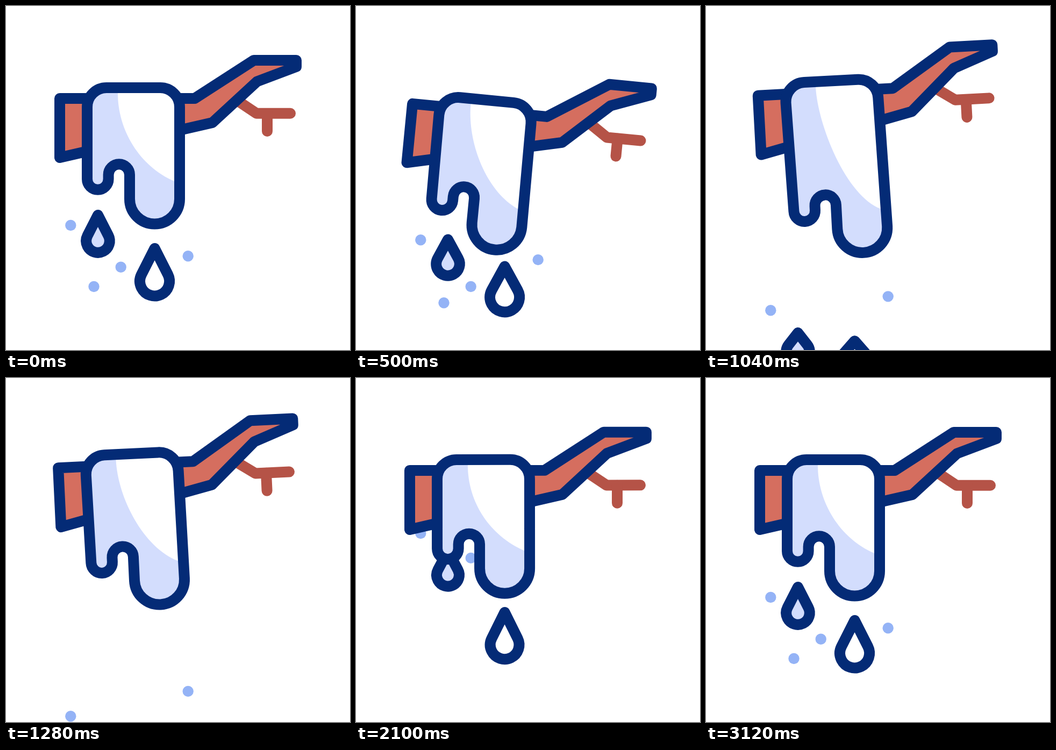
Animation of 640x640 px, one loop 3600 ms. Source, as an HTML page with a canvas:

```html
<!DOCTYPE html>
<html lang="en">
<head>
<meta charset="utf-8">
<title>Melting snow</title>
<style>
html, body { margin: 0; width: 100%; height: 100%; overflow: hidden; background: #fff; }
canvas { display: block; width: 640px; height: 640px; }
</style>
</head>
<body>
<canvas id="stage" width="640" height="640"></canvas>
<script>
const ctx = document.getElementById('stage').getContext('2d');
const LOOP = 3600;
const NAVY = '#042b76', RED = '#d56e5f', BARK = '#b55347';
const SNOW = '#d3ddfd', DOT = '#94b3f6', WHITE = '#fff';

const clamp = v => Math.min(1, Math.max(0, v));
const lerp = (a, b, p) => a + (b - a) * p;
const smooth = v => { const x = clamp(v); return x * x * (3 - 2 * x); };
const firm = v => {
  const x = clamp(v);
  return (smooth(x) + x * x * x * (x * (6 * x - 15) + 10)) / 2;
};

// keys: [time, value] pairs
function track(keys, t, ease) {
  let [t0, v0] = keys[0];
  for (const [t1, v1] of keys) {
    if (t < t1) return t <= t0 ? v0 : lerp(v0, v1, ease((t - t0) / (t1 - t0)));
    t0 = t1; v0 = v1;
  }
  return v0;
}

const TILT = [[200, 0], [600, 6.3], [1000, -3.08], [2200, 0]];
const MELT = [[200, 0], [1000, 70], [1580, -15], [2400, 0]];

// out / back: [start, duration, distance]
const dots = [
  { x: 120.3, y: 408, out: [200, 1600, 294], back: [1800, 1320, 137] },
  { x: 338.7, y: 465.3, out: [300, 2000, 242], back: [2000, 1100, 265] },
  { x: 213.7, y: 485.7, out: [200, 1080, 191], back: [1700, 1100, 216] },
  { x: 163.5, y: 522, out: [200, 1120, 170], back: [1700, 1420, 217] }
];

// r, h: radius and tip height at rest; seed: both when newly formed; flat: tip loss while falling
const drops = [
  { x: 171, y: 437, r: 21.8, h: 48, seed: [20, 40], flat: 15, fill: SNOW,
    out: [200, 1140, 249], back: [1700, 780, 147] },
  { x: 276.6, y: 512, r: 27.5, h: 61, seed: [21.5, 22], flat: 26, fill: WHITE,
    out: [200, 1250, 204], back: [1490, 765, 149] }
];

function fall(o, t) {
  const returning = t >= o.back[0];
  const [start, time, dist] = returning ? o.back : o.out;
  const p = smooth((t - start) / time);
  return { returning, p, y: o.y + (returning ? dist * (p - 1) : dist * p) };
}

function drawDot(o, t) {
  ctx.beginPath();
  ctx.arc(o.x, fall(o, t).y, 10.2, 0, Math.PI * 2);
  ctx.fillStyle = DOT;
  ctx.fill();
}

function drawDrop(o, t) {
  const { returning, p, y } = fall(o, t);
  const r = returning ? lerp(o.seed[0], o.r, p) : o.r;
  const h = returning ? lerp(o.seed[1], o.h, clamp(p * 1.1)) : o.h - o.flat * p;
  const a = Math.asin(Math.min(1, r / h));
  ctx.beginPath();
  ctx.moveTo(o.x, y - h);
  ctx.arc(o.x, y, r, -a, Math.PI + a);
  ctx.closePath();
  paint(o.fill);
}

function paint(fill) {
  ctx.fillStyle = fill;
  ctx.fill();
  ctx.strokeStyle = NAVY;
  ctx.stroke();
}

function poly(points) {
  ctx.beginPath();
  for (const [x, y] of points) ctx.lineTo(x, y);
}

function drawTwig() {
  ctx.strokeStyle = BARK;
  poly([[420, 169], [466, 199.7], [529, 199.7]]);
  ctx.stroke();
  poly([[486, 200], [486, 233]]);
  ctx.stroke();
}

function drawBranch() {
  poly([[100, 172], [351, 172], [461, 101], [540, 101], [540, 113], [467, 140.5], [384, 217], [100, 282]]);
  ctx.closePath();
  paint(RED);
}

function drawSnow(dy) {
  const dx = Math.max(0, dy) / 17;
  const s = new Path2D();
  s.moveTo(151, 188);
  s.arcTo(151, 152, 187, 152, 36);
  s.lineTo(287, 152);
  s.arcTo(323, 152, 323, 188, 36);
  s.lineTo(323 + dx, 359 + dy);
  s.arc(276.5 + dx, 359 + dy, 46.5, 0, Math.PI);
  s.lineTo(230 + dx, 314 + dy);
  s.arc(210.3 + dx, 314 + dy, 19.7, 0, Math.PI, true);
  s.lineTo(190.6 + dx, 322 + dy);
  s.arc(170.8 + dx, 322 + dy, 19.8, 0, Math.PI);
  s.closePath();

  ctx.fillStyle = SNOW;
  ctx.fill(s);
  ctx.save();
  ctx.clip(s);
  ctx.beginPath();
  ctx.moveTo(208, 150);
  ctx.lineTo(208, 162);
  ctx.bezierCurveTo(208, 231.5, 249 + dx, 298 + dy, 313 + dx, 326 + dy);
  ctx.lineTo(340 + dx, 338 + dy);
  ctx.lineTo(340, 150);
  ctx.fillStyle = WHITE;
  ctx.fill();
  ctx.restore();
  ctx.strokeStyle = NAVY;
  ctx.stroke(s);
}

function draw(t) {
  ctx.fillStyle = WHITE;
  ctx.fillRect(0, 0, 640, 640);
  ctx.lineWidth = 20;
  ctx.lineCap = ctx.lineJoin = 'round';

  dots.forEach(o => drawDot(o, t));
  drops.forEach(o => drawDrop(o, t));

  ctx.save();
  ctx.translate(0, 230);
  ctx.rotate(track(TILT, t, firm) * Math.PI / 180);
  ctx.translate(0, -230);
  drawTwig();
  drawBranch();
  drawSnow(track(MELT, t, smooth));
  ctx.restore();
}

const begin = performance.now();
function tick() {
  draw((performance.now() - begin) % LOOP);
  requestAnimationFrame(tick);
}
tick();
</script>
</body>
</html>
```
